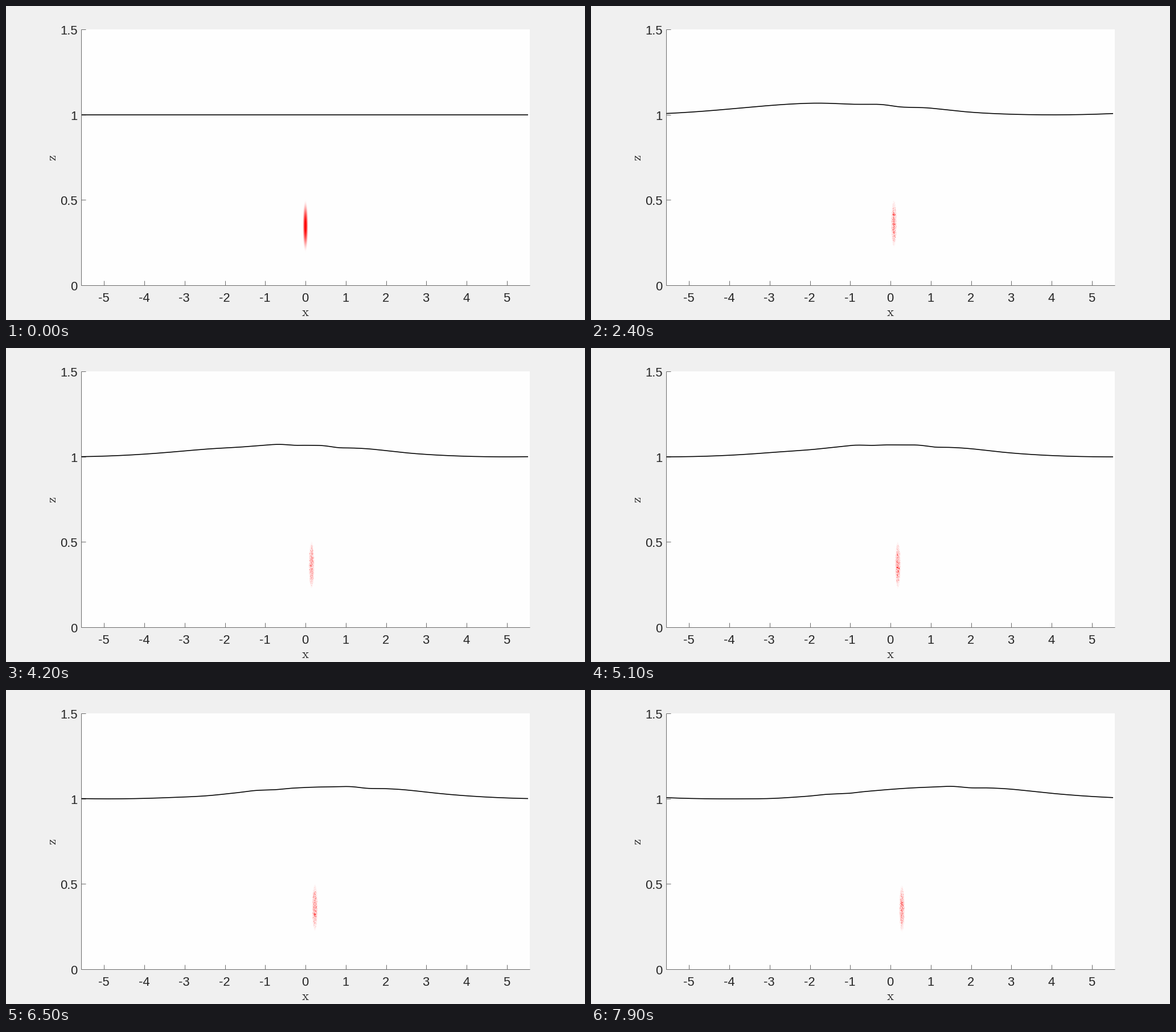
A matplotlib script that plays this animation: 1017 by 551 pixels, repeating every 8 s.

```python
import numpy as np
import matplotlib
import matplotlib.pyplot as plt
from matplotlib.animation import FuncAnimation
from matplotlib.patches import Rectangle

matplotlib.rcParams["toolbar"] = "None"
matplotlib.rcParams["mathtext.fontset"] = "cm"

W, H, DPI = 1017, 551, 64
PT = 72 / DPI                     # points per pixel
FRAMES, STEP = 80, 100

LEFT, RIGHT, TOP, BOTTOM = 132, 920, 41, 490
X0, UNIT_X, UNIT_Z = 526.0, 70.75, 299.3
PERIOD = 787                      # wavelength of the long wave, px
INK, AXIS, PAPER = "#262626", "#6a6a6a", 254 / 255

fig = plt.figure(figsize=(W / DPI, H / DPI), dpi=DPI, facecolor="#f0f0f0")
ax = fig.add_axes([0, 0, 1, 1])
ax.axis("off")


def px(x):
    return X0 + UNIT_X * x


def pz(z):
    return BOTTOM - UNIT_Z * z


def label(x, y, text, ha="center"):
    ax.text(x, y, text, ha=ha, va="baseline", color=INK,
            family="Liberation Sans", size=22 * PT)


def rule(xs, ys):
    ax.plot(xs, ys, color=AXIS, lw=PT, solid_capstyle="butt", zorder=3)


ax.add_patch(Rectangle((LEFT, TOP), RIGHT - LEFT, BOTTOM - TOP,
                       fc=(PAPER,) * 3, lw=0))
rule([LEFT, RIGHT], [BOTTOM, BOTTOM])
rule([LEFT, LEFT], [TOP, BOTTOM])

for n in range(-5, 6):
    rule([px(n), px(n)], [BOTTOM, BOTTOM - 8])
    label(px(n) - 0.6, 518.8, str(n))
for z in (0, 0.5, 1, 1.5):
    rule([LEFT, LEFT + 8], [pz(z), pz(z)])
    label(125.6, pz(z) + 8.8, f"{z:g}", "right")

for x, y, name, turn in ((X0, 537.7, "x", 0), (81.5, 266, "z", 90)):
    ax.text(x, y, rf"$\mathrm{{{name}}}$", ha="center", va="center",
            color=INK, size=23 * PT, rotation=turn)

xs = np.linspace(LEFT + 0.5, 917, 700)
surface, = ax.plot([], [], color="black", lw=1.6 * PT, zorder=4,
                   solid_capstyle="butt")

# Pixel grid that holds the red cloud
gx0, gx1, gy0, gy1 = 510, 562, 325, 445
gx, gy = np.meshgrid(np.arange(gx0, gx1) + 0.5, np.arange(gy0, gy1) + 0.5)
cloud = ax.imshow(np.ones(gx.shape + (3,)), extent=(gx0, gx1, gy1, gy0),
                  interpolation="nearest", aspect="auto", zorder=2)

ax.set_xlim(0, W)
ax.set_ylim(H, 0)


def pulse(d, center, inner, outer):
    """Bell with different widths on the side facing the middle and away."""
    away = (d - center) * np.sign(center)
    width = np.where(away > 0, outer, inner)
    return np.exp(-0.5 * (away / width) ** 2)


def wave(t):
    phase = 2 * np.pi * (xs - 720.2 - 38 * t) / PERIOD
    y = 181.6 + 10.5 * np.cos(phase) - 1.1 * np.cos(2 * phase)
    d = xs - X0
    # Leading ripples: a hump to the right, a hollow to the left
    reach = 8 + 25.5 * t
    inner = 12 + 3.2 * min(t, 5)
    rise = min(1, 0.3 + 0.7 * t)
    y -= rise * (2.2 - 0.13 * t) * pulse(d, reach, inner, 36)
    y += rise * (2.0 - 0.16 * t) * pulse(d, -reach, inner, 32)
    # Trailing ripples: speed, start, height, width
    for speed, start, height, width in ((22.5, 1.6, 1.0, 12),
                                        (20.6, 2.8, -0.95, 14),
                                        (-18, 1.5, -0.95, 14),
                                        (-14.3, 2.9, 0.6, 10)):
        age = t - start
        if age > 0:
            y += height * min(1, age) * pulse(d, speed * age, width, width)
    return y


def blob(cx, cy, rx, ry, power):
    r2 = ((gx - cx) / rx) ** 2 + ((gy - cy) / ry) ** 2
    return np.clip(1 - r2, 0, 1) ** power


def update(i):
    t = i * STEP / 1000
    if i == 0:
        surface.set_data(xs, np.full_like(xs, pz(1)))
        v = 1.05 * blob(X0, 386, 5.2, 47, 2)
    else:
        surface.set_data(xs, wave(t))
        rng = np.random.default_rng(100 + i)
        g = blob(X0 + 2.55 * t, 385 - 4 * np.sin(np.pi * t / 9), 5.2, 42, 1.3)
        v = g * (0.12 + 0.27 * rng.gamma(0.9, 1.0, g.shape))
    v = np.clip(v, 0, 1)
    fade = PAPER * (1 - v)
    cloud.set_data(np.dstack([fade + v, fade, fade]))
    return surface, cloud


anim = FuncAnimation(fig, update, frames=FRAMES, interval=STEP,
                     init_func=lambda: update(0), repeat=True,
                     repeat_delay=0, blit=False)
plt.show()
```
